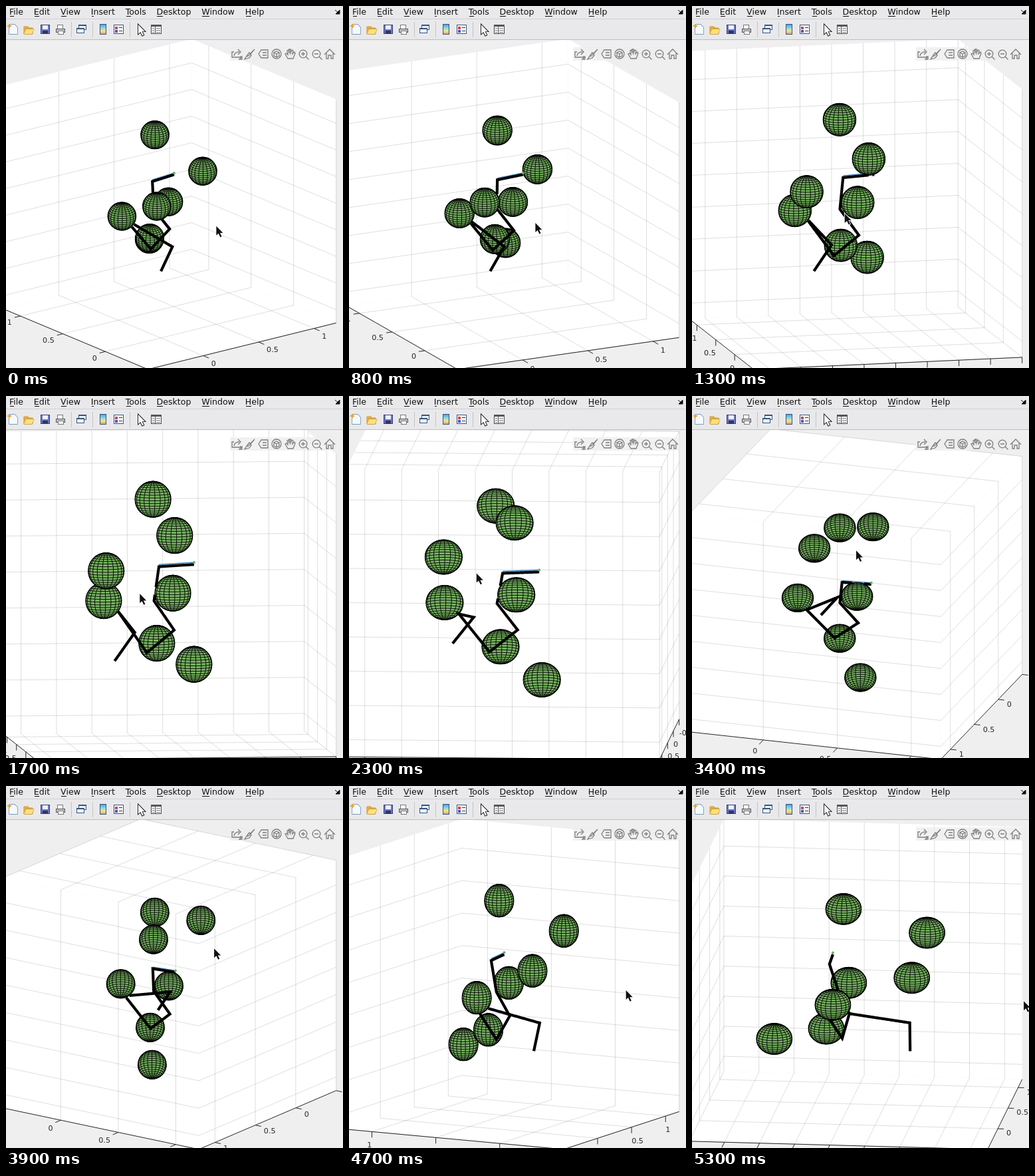
An HTML page with a canvas that plays this animation: 507 by 544 pixels, repeating every 5.4 s.

```html
<!DOCTYPE html>
<html>
<head>
<meta charset="utf-8">
<style>
html, body { margin: 0; width: 100%; height: 100%; overflow: hidden; background: #efefef; }
canvas { display: block; }
</style>
</head>
<body>
<canvas id="c" width="507" height="544"></canvas>
<script>
const g = document.getElementById('c').getContext('2d');
const LOOP = 5400, STEP = 100, RAD = Math.PI / 180;
const BOX = { l: -4, r: 496.7, t: 49.5, b: 546 };
const LO = -.5, XY = 1.7, Z = 1.68; // axis start and spans

// turning points of the drag: time, azimuth, elevation
const VIEWS = [
  [300, -37.5, 18.8], [800, -26.6, 16.8], [1700, -6.05, 4.8], [3000, -8.2, -20.7],
  [3900, -35.1, -17.3], [4700, -62, 8.9], [5300, -83.4, 15.6]
];

// ball centres and arm joints in unit box coordinates
const R = .0592;
const BALLS = [
  [.448, .535, .811], [.491, .26, .714], [.266, .285, .597], [.513, .525, .501],
  [.286, .552, .476], [.467, .595, .33], [.611, .786, .243]
];
const ARM = [
  [.295, .294, .298], [.363, .303, .391], [.334, .59, .442], [.428, .537, .304],
  [.517, .523, .379], [.453, .55, .474], [.473, .585, .584], [.59, .587, .59]
];
const TIP = ARM.slice(-2).map(([u, v, w]) => [u, v, w + .007]);

function slope(i, k) {
  if (i === 0) return 0;
  const a = VIEWS[i - 1], b = VIEWS[Math.min(i + 1, VIEWS.length - 1)];
  return (b[k] - a[k]) / (b[0] - a[0]);
}

// cubic Hermite through the turning points
function view(t) {
  t = Math.max(t, VIEWS[0][0]);
  let i = 0;
  while (i < VIEWS.length - 2 && t > VIEWS[i + 1][0]) i++;
  const a = VIEWS[i], b = VIEWS[i + 1], h = b[0] - a[0], s = (t - a[0]) / h;
  return [1, 2].map(k =>
    (1 + 2 * s) * (1 - s) ** 2 * a[k] + s * (1 - s) ** 2 * h * slope(i, k) +
    s * s * (3 - 2 * s) * b[k] + s * s * (s - 1) * h * slope(i + 1, k));
}

// orthographic view stretched so that the unit box fills BOX
function camera(az, el) {
  const c = Math.cos(az * RAD), s = -Math.sin(az * RAD);
  const ce = Math.cos(el * RAD), se = Math.sin(el * RAD);
  const sx = (BOX.r - BOX.l) / (c + s);
  const sy = (BOX.b - BOX.t) / ((c + s) * Math.abs(se) + ce);
  const low = Math.min(0, se * (c + s));
  const dir = (u, v, w) => [sx * (c * u - s * v), -sy * (se * (s * u + c * v) + ce * w)];
  return {
    el, dir, lenX: sx * c, lenY: sx * s, rx: sx * R, ry: sy * R,
    at(u, v, w) {
      const [x, y] = dir(u, v, w);
      return [BOX.l + sx * s + x, BOX.b + sy * low + y];
    },
    depth: (u, v, w) => se * w - ce * (s * u + c * v)
  };
}

function trace(pts) {
  g.beginPath();
  pts.forEach(p => g.lineTo(...p));
}
function line(pts, color) {
  trace(pts);
  g.strokeStyle = color;
  g.lineWidth = 1;
  g.stroke();
}
function rect(x, y, w, h, color) {
  g.fillStyle = color;
  g.fillRect(x, y, w, h);
}
function panel(x, y, w, h, fill, edge) {
  rect(x, y, w, h, edge);
  rect(x + 1, y + 1, w - 2, h - 2, fill);
}
// an SVG path drawn around (x, y)
function icon(x, y, d, stroke, fill, width = 1.3) {
  const p = new Path2D(d);
  g.save();
  g.translate(x, y);
  g.lineWidth = width;
  if (stroke) { g.strokeStyle = stroke; g.stroke(p); }
  if (fill) { g.fillStyle = fill; g.fill(p); }
  g.restore();
}

function ticks(step, span) {
  const out = [];
  for (let i = Math.ceil(LO / step - 1e-6); i * step <= LO + span + 1e-6; i++) out.push(+(i * step).toFixed(1));
  return out;
}

function drawAxes(cam) {
  const P = cam.at, side = cam.el > 0 ? 0 : 1, ink = '#262626';
  for (const face of [(a, b) => P(a, b, side), (a, b) => P(1, a, b), (a, b) => P(a, 1, b)]) {
    trace([face(0, 0), face(1, 0), face(1, 1), face(0, 1)]);
    g.fillStyle = '#fff';
    g.fill();
  }

  const grid = (...pts) => line(pts.map(p => P(...p)), 'rgba(38,38,38,.15)');
  const unit = v => (v - LO) / XY;
  const xs = ticks(cam.lenX > 390 ? .2 : .5, XY), ys = ticks(cam.lenY > 390 ? .2 : .5, XY);
  for (const u of xs.map(unit)) grid([u, 0, side], [u, 1, side], [u, 1, 1 - side]);
  for (const v of ys.map(unit)) grid([0, v, side], [1, v, side], [1, v, 1 - side]);
  for (const z of ticks(.2, Z)) {
    const w = (z - LO) / Z;
    grid([0, 1, w], [1, 1, w], [1, 0, w]);
  }

  line([P(0, side, 0), P(1, side, 0)], ink);
  line([P(side, 0, 0), P(side, 1, 0)], ink);
  g.font = '11.2px "DejaVu Sans", sans-serif';
  g.textBaseline = 'middle';
  const mark = ([x, y], d, label, right) => {
    if (Math.abs(cam.el) < 12) d = [0, 1];
    const n = Math.hypot(...d), dx = d[0] / n, dy = d[1] / n;
    line([[x, y], [x + 9 * dx, y + 9 * dy]], ink);
    g.fillStyle = ink;
    g.textAlign = right ? 'left' : 'right';
    g.fillText(label, x + 13 * dx, y + 7 + 14 * dy);
  };
  const out = side ? 1 : -1;
  for (const x of xs) mark(P(unit(x), side, 0), cam.dir(0, out, 0), x, !side);
  for (const y of ys) mark(P(side, unit(y), 0), cam.dir(out, 0, 0), y, side);
}

// 20 by 20 sphere mesh, front half only
function drawBall(cam, b) {
  const [x, y] = cam.at(...b);
  g.beginPath();
  g.ellipse(x, y, cam.rx, cam.ry, 0, 0, 7);
  g.fillStyle = '#77b561';
  g.fill();
  g.strokeStyle = '#000';
  g.lineWidth = 1.3;
  g.stroke();
  const vert = (i, j) => {
    const th = i * 18 * RAD, ph = (j * 9 - 90) * RAD;
    return [Math.cos(ph) * Math.cos(th), Math.cos(ph) * Math.sin(th), Math.sin(ph)];
  };
  g.beginPath();
  const edge = (p, q) => {
    if (cam.depth(...p) + cam.depth(...q) < 0) return;
    const a = cam.dir(...p), e = cam.dir(...q);
    g.moveTo(x + a[0] * R, y + a[1] * R);
    g.lineTo(x + e[0] * R, y + e[1] * R);
  };
  for (let i = 0; i < 20; i++)
    for (let j = 0; j < 20; j++) {
      edge(vert(i, j), vert(i, j + 1));
      edge(vert(i, j), vert(i + 1, j));
    }
  g.lineWidth = .9;
  g.stroke();
}

function hidden(cam, p) {
  const [x, y] = cam.at(...p), d = cam.depth(...p);
  return BALLS.some(b => {
    const [bx, by] = cam.at(...b);
    const q = ((x - bx) / cam.rx) ** 2 + ((y - by) / cam.ry) ** 2;
    return q < 1 && d < cam.depth(...b) + R * Math.sqrt(1 - q);
  });
}

function drawRod(cam, pts, color, width) {
  const N = 60;
  let pen = false;
  g.beginPath();
  for (let i = 0; i < pts.length - 1; i++)
    for (let k = i ? 1 : 0; k <= N; k++) {
      const p = pts[i].map((v, n) => v + (pts[i + 1][n] - v) * k / N);
      if (hidden(cam, p)) { pen = false; continue; }
      const s = cam.at(...p);
      pen ? g.lineTo(...s) : g.moveTo(...s);
      pen = true;
    }
  g.strokeStyle = color;
  g.lineWidth = width;
  g.stroke();
}

function drawArrow(x, y, stroke, fill) {
  icon(x, y, 'M0 0V14L3.3 11 6 16.6 8.2 15.6 5.6 10.2H10Z', stroke, fill, 1.8);
}

function drawMenu() {
  rect(0, 0, 507, 51, '#e9e9eb');
  rect(0, 19, 507, 1, '#d2d2d4');
  rect(0, 50, 507, 1, '#bdbdbd');
  g.font = '12.6px "DejaVu Sans", sans-serif';
  g.textAlign = 'left';
  g.textBaseline = 'alphabetic';
  g.fillStyle = '#111';
  let x = 5;
  for (const name of 'File Edit View Insert Tools Desktop Window Help'.split(' ')) {
    g.fillText(name, x, 13);
    g.fillRect(Math.round(x) + 1, 15, Math.round(g.measureText(name[0]).width) - 1, 1);
    x += g.measureText(name).width + 15.8;
  }
  icon(499, 9, 'M-4-3L2 2M3-3V3H-3Z', '#111', '#111', 1);
}

function drawTools() {
  const navy = '#35557d';
  for (const x of [98, 130, 186]) rect(x, 24, 1, 23, '#c4c4c4');
  // new, open, save, print
  icon(11, 35, 'M-6-7H2L6-3V7H-6Z', '#5b7fa5', '#f4faff');
  icon(5, 30, 'M-3 0H3M0-3V3', '#f0a020', null, 2);
  icon(34, 35, 'M-7 7V-4H-1L1-2H6V7Z', '#c08a28', '#e2ac3c', 1);
  icon(34, 35, 'M-7 7L-4 0H8L5 7Z', '#c08a28', '#ffe07a', 1);
  panel(52, 28, 14, 14, '#6d77c4', '#333d80');
  rect(55, 29, 8, 6, '#eef2ff');
  rect(55, 37, 8, 5, '#30365f');
  panel(77, 28, 9, 8, '#fff', '#777');
  panel(75, 34, 14, 6, '#c2c6cc', '#555');
  panel(78, 37, 9, 6, '#fff', '#777');
  // linked plots
  for (const k of [0, 1]) {
    panel(109 - 3 * k, 28 + 5 * k, 12, 8, '#eaf2fb', navy);
    rect(109 - 3 * k, 28 + 5 * k, 12, 2, navy);
  }
  // color bar
  const grad = g.createLinearGradient(0, 28, 0, 42);
  ['#5a9bea', '#7fd7e6', '#f3e48a', '#f0a060'].forEach((c, i) => grad.addColorStop(i / 3, c));
  panel(141, 27, 10, 16, grad, navy);
  // legend
  panel(162, 28, 15, 14, '#fff', navy);
  ['#d94040', '#4054d0'].forEach((c, i) => {
    rect(164, 31 + 5 * i, 4, 4, c);
    rect(170, 32 + 5 * i, 5, 1, '#333');
  });
  drawArrow(199, 28, '#111', '#fff');
  // inspector
  panel(218, 28, 16, 14, '#fff', '#444');
  rect(218, 28, 16, 3, '#555');
  rect(224, 31, 1, 11, '#444');
  for (let y = 33; y < 40; y += 3) {
    rect(220, y, 3, 1, '#777');
    rect(226, y, 6, 1, '#777');
  }
}

function drawAxesBar() {
  rect(337, 62, 160, 20, 'rgba(239,239,239,.85)');
  const lens = 'M5.8 0A5.8 5.8 0 1 1-5.8 0A5.8 5.8 0 1 1 5.8 0M4 4L8.5 8.5M-3 0H3';
  [
    'M-4-3H-7V5H6V3M-4 3Q-3-3 4-3M2-7L6-3 2 1M4 8H8V4Z', // export
    'M7-7L0 1M1 0L-1-2-4 2-8 8-1 6 2 2ZM6-6L0 0M-4 4L0 1', // brush
    'M-7 0L-3-6H7V6H-3ZM-1-2H5M-1 2H5', // data tip
    'M7 0A7 7 0 1 1-7 0A7 7 0 1 1 7 0M0-4L4-2V3L0 5-4 3V-2ZM-4-2L0 0 4-2M0 0V5', // rotate
    'M-3 7L-7 0-5-1-3 1-4-5-2-6-1-1V-7H1V-1L3-6 5-5 4 0 7-3 8-1 5 7Z', // pan
    lens + 'M0-3V3', // zoom in
    lens, // zoom out
    'M-8 1L0-7 8 1M-5-1V7H-2V2H2V7H5V-1' // home
  ].forEach((d, i) => icon(347 + 20 * i, 72, d, '#7d7d7d'));
}

function draw(now) {
  const t = Math.floor(now % LOOP / STEP) * STEP;
  const [az, el] = view(t), cam = camera(az, el);

  rect(0, 0, 507, 544, '#efefef');
  drawAxes(cam);
  BALLS.slice().sort((a, b) => cam.depth(...a) - cam.depth(...b)).forEach(b => drawBall(cam, b));
  drawRod(cam, TIP, '#3f86b8', 1.5);
  drawRod(cam, ARM, '#000', 4.2);
  if (!hidden(cam, TIP[1])) {
    const [x, y] = cam.at(...TIP[1]);
    g.beginPath();
    g.arc(x, y, 2, 0, 7);
    g.fillStyle = '#6fae62';
    g.fill();
  }
  drawMenu();
  drawTools();
  drawAxesBar();
  // the pointer drags the view, after a short approach
  drawArrow(178 - 3.85 * az - 6 * Math.max(0, 1 - t / 200), 285.7 + 2.4 * el, '#fff', '#111');
}

function tick() {
  draw(performance.now());
  requestAnimationFrame(tick);
}
tick();
</script>
</body>
</html>
```
